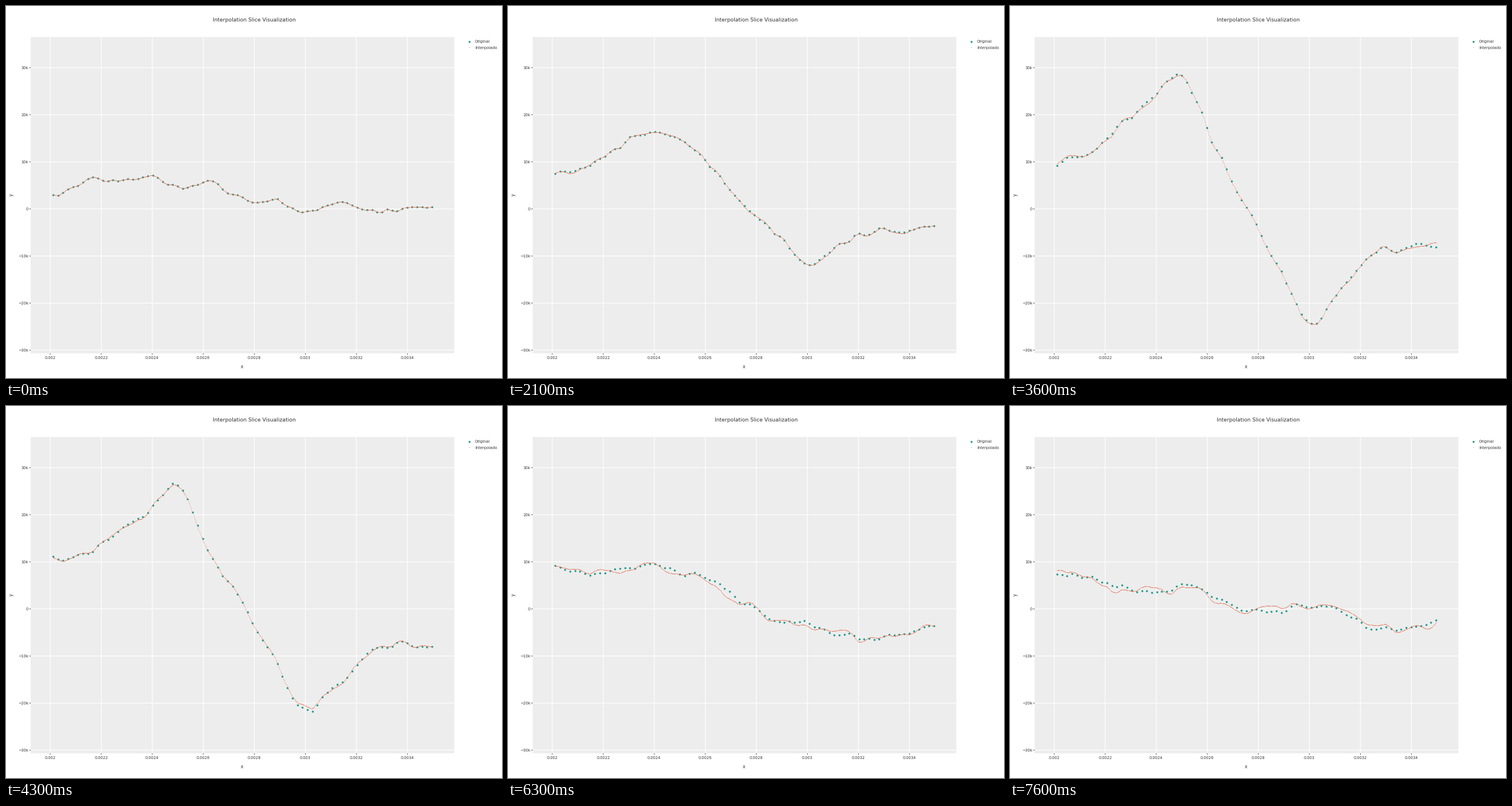
A matplotlib script that plays this animation: 864 px wide and 648 px high, repeating every 7.7 s.

```python
import numpy as np
import matplotlib.pyplot as plt
from matplotlib.animation import FuncAnimation

W, H, DPI = 864, 648, 100
FRAMES, STEP = 77, 100
PX = 72 / DPI
TEAL, CORAL, INK, PANEL = "#2a9d8f", "#e76f51", "#333333", "#ededed"
LEFT, RIGHT, TOP, BOTTOM = 43.2, 781, 54, 604.8
ZERO_Y, UNIT = 353.5, 0.82      # y = 0 on screen, pixels per 100 units
N = 77

# Outline of the slice at a few times (ms), evenly spaced in x, in hundreds.
OUTLINES = {
    0: [28, 59, 60, 70, 50, 55, 22, 17, -5, 10, -2, -3, 15],
    1300: [63, 85, 98, 105, 88, 66, 20, -16, -36, -35, -17, -25, 2],
    2900: [82, 98, 155, 216, 213, 112, 2, -90, -196, -124, -77, -70, -63],
    4300: [108, 115, 163, 205, 259, 113, 12, -110, -213, -159, -95, -77, -76],
    5200: [112, 103, 138, 168, 150, 91, 18, -60, -121, -101, -92, -74, -62],
    6300: [92, 74, 85, 97, 76, 60, 16, -22, -30, -55, -65, -52, -37],
    7600: [66, 67, 46, 34, 50, 25, 0, -10, 6, -4, -45, -40, -26],
}


def hermite(t, x, y):
    """Smooth curve through the points (x, y), y along its first axis."""
    m = np.gradient(y, x, axis=0)
    k = np.clip(np.searchsorted(x, t, side="right") - 1, 0, len(x) - 2)
    h = x[k + 1] - x[k]
    u = (t - x[k]) / h
    s = u * u * (3 - 2 * u)
    return ((1 - s) * y[k] + s * y[k + 1]
            + h * u * (1 - u) * ((1 - u) * m[k] - u * m[k + 1]))


def ripple(rng, width):
    """Rows of unit noise, smoothed along x over about `width` samples."""
    kernel = np.hanning(width + 2)
    kernel /= np.sqrt((kernel ** 2).sum())
    raw = rng.normal(size=(len(beats), N + 2 * width))
    return np.array([np.convolve(row, kernel, "same")[width:-width]
                     for row in raw])


def swell(ms):
    """Extra amplitude around the crest of the wave."""
    u = np.clip((ms - 2900) / 1400, 0, 1)
    return 1 + 0.08 * np.sin(np.pi * u) ** 2


def screen_x(i):
    return 82 + 660 * i / (N - 1)


def screen_y(v):
    return ZERO_Y - UNIT * v


times = np.array(list(OUTLINES), float)
outlines = np.array(list(OUTLINES.values()), float)
index = np.arange(N, dtype=float)
fine = np.linspace(0, N - 1, 600)
knots = np.linspace(0, N - 1, outlines.shape[1])

rng = np.random.default_rng(4)
beats = np.arange(0, FRAMES * STEP + 401, 400.0)
texture = 4 * ripple(rng, 3)
drift = 6 * ripple(rng, 5)

fig = plt.figure(figsize=(W / DPI, H / DPI), dpi=DPI, facecolor="white")
ax = fig.add_axes([0, 0, 1, 1])
ax.set_xlim(0, W)
ax.set_ylim(H, 0)
ax.axis("off")


def label(x, y, s, size, **kw):
    kw = {"ha": "center", "va": "baseline", **kw}
    ax.text(x, y, s, fontsize=size * PX, color=INK, family="DejaVu Sans", **kw)


def segment(xs, ys, color, width):
    ax.plot(xs, ys, color=color, lw=width * PX, solid_capstyle="butt",
            snap=False, zorder=1)


def dots(xs, ys, color, size, z):
    return ax.plot(xs, ys, "o", color=color, ms=size * PX, mew=0,
                   snap=False, zorder=z)[0]


ax.add_patch(plt.Rectangle((LEFT, TOP), RIGHT - LEFT, BOTTOM - TOP,
                           fc=PANEL, lw=0, zorder=0))

for j in range(8):
    x = 77 + 88.9 * j
    segment([x, x], [TOP, BOTTOM], "white", 1.2)
    segment([x, x], [BOTTOM, BOTTOM + 2.7], INK, 0.8)
    label(x, 615.4, f"{0.002 + 0.0002 * j:.4f}".rstrip("0"), 6.6)

for k in range(-30, 31, 10):
    y = screen_y(10 * k)
    segment([LEFT, RIGHT], [y, y], "white", 1.2)
    segment([LEFT - 2.7, LEFT], [y, y], INK, 0.8)
    label(39, y + 2.4, f"{k}k".replace("-", "\u2212") if k else "0", 6.6,
          ha="right")

label(432, 27, "Interpolation Slice Visualization", 9.15)
label(411.5, 630.8, "x", 7.6)
label(9, 329, "y", 7.6, va="center", rotation=90)

dots([806.5], [62], TEAL, 3.5, 2)
dots([806.5], [72], CORAL, 1.1, 2)
label(817, 64.4, "Original", 6.6, ha="left")
label(817, 74.6, "Interpolado", 6.6, ha="left")

points = dots(screen_x(index), 0 * index, TEAL, 3.5, 2)
curve = dots(screen_x(fine), 0 * fine, CORAL, 1.15, 3)


def update(n):
    ms = n * STEP
    outline = hermite(ms, times, outlines) * swell(ms)
    values = hermite(index, knots, outline) + hermite(ms, beats, texture)
    # The fit starts out exact and loosens as time goes on.
    fitted = values + n / FRAMES * hermite(ms, beats, drift)
    points.set_ydata(screen_y(values))
    curve.set_ydata(screen_y(hermite(fine, index, fitted)))
    return points, curve


anim = FuncAnimation(fig, update, frames=FRAMES, interval=STEP, repeat=True,
                     repeat_delay=0, blit=False)
plt.show()
```
